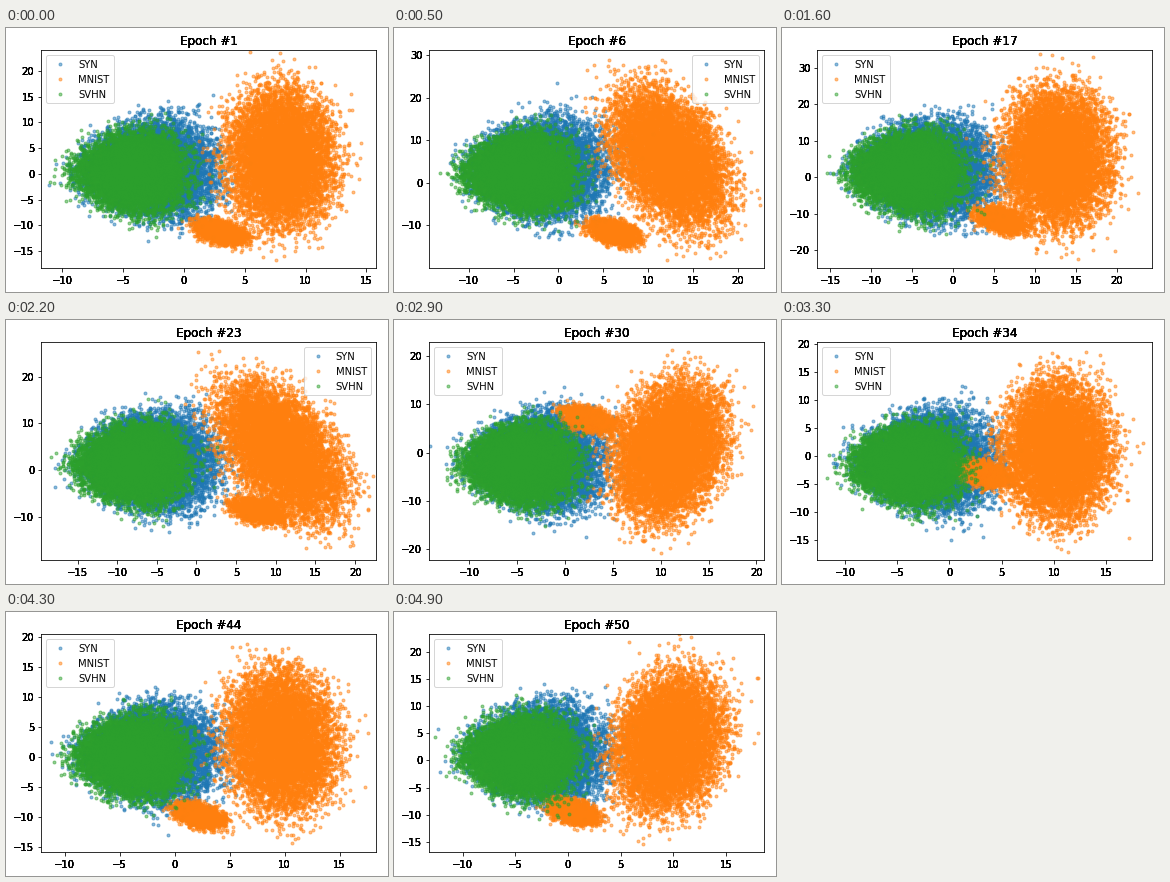
Write a matplotlib script that moves like this. It is 382 by 264 pixels and loops after 5000 ms.

```python
import matplotlib.pyplot as plt
import numpy as np
from matplotlib.animation import FuncAnimation

WIDTH, HEIGHT, DPI = 382, 264, 72
LEFT, TOP, AX_W, AX_H = 35.3, 22.3, 334.8, 217.44
EPOCHS = 50
PASSES = 6  # titles and tick labels are overprinted, which thickens them

# Epoch: x limits, y limits, lean of the MNIST cloud, centre of its side clump
KEYS = {
    1: (-11.73, 15.8, -18.2, 24.0, 0.0, 214, 204),
    10: (-16.55, 28.65, -21.4, 36.9, 0.6, 224, 204),
    17: (-16.55, 24.3, -24.75, 34.85, 0.0, 218, 191),
    23: (-19.57, 22.65, -19.2, 27.35, 0.45, 250, 190),
    30: (-14.2, 20.8, -22.2, 22.9, -0.2, 194, 99),
    38: (-11.1, 18.04, -14.8, 17.65, 0.25, 207, 207),
    50: (-13.15, 18.6, -16.8, 23.2, -0.15, 179, 199),
}


def pose(epoch):
    return [np.interp(epoch, list(KEYS), track) for track in zip(*KEYS.values())]


def blob(rng, count, x, y, rx, ry, lean=0.0, taper=0.0):
    """Points in stage pixels: an even core with a soft rim."""
    angle = rng.uniform(0, 2 * np.pi, count)
    radius = np.abs(rng.normal(size=count)) ** 0.6 / 2
    u, v = radius * np.cos(angle), radius * np.sin(angle)
    v *= 1 + taper * np.clip(u, -1, 1)
    return np.array([x + rx * u + lean * ry * v, y + ry * v])


plt.rcParams["font.family"] = "DejaVu Sans"
fig = plt.figure(figsize=(WIDTH / DPI, HEIGHT / DPI), dpi=DPI, facecolor="white")
box = [LEFT / WIDTH, 1 - (TOP + AX_H) / HEIGHT, AX_W / WIDTH, AX_H / HEIGHT]
layers = [fig.add_axes(box, label=str(i)) for i in range(PASSES)]
base = layers[0]
titles = [layer.set_title("", fontsize=12, pad=5) for layer in layers]
base.tick_params(axis="x", pad=4.5)
for layer in layers[1:]:
    layer.set_frame_on(False)
    layer.tick_params(axis="x", length=0, pad=8)
    layer.tick_params(axis="y", length=0, pad=7)

dots = {
    name: base.plot([], [], ".", color=color, markersize=6, alpha=0.5,
                    label=name, transform=base.transAxes)[0]
    for name, color in [("SYN", "C0"), ("MNIST", "C1"), ("SVHN", "C2")]
}


def place(name, points):
    x, y = points
    dots[name].set_data((x - LEFT) / AX_W, 1 - (y - TOP) / AX_H)


def update(frame):
    epoch = frame + 1
    rng = np.random.default_rng(epoch)
    x0, x1, y0, y1, lean, clump_x, clump_y = pose(epoch)

    place("SYN", blob(rng, 9000, 145, 141, 94, 68, taper=0.3))
    place("MNIST", np.hstack([
        blob(rng, 8500, 275, 130, 80, 102, lean),
        blob(rng, 1500, clump_x, clump_y, 36, 20, lean=0.8),
    ]))
    place("SVHN", blob(rng, 9000, 126, 144, 78, 56, taper=0.3))

    for layer, title in zip(layers, titles):
        layer.set_xlim(x0, x1)
        layer.set_ylim(y0, y1)
        title.set_text(f"Epoch #{epoch}")

    # The legend sits in the corner the cloud leans away from
    corner = "upper right" if lean > 0.1 else "upper left"
    for text in base.legend(loc=corner, fontsize=10).get_texts():
        text.set_y(-1)
    return []


anim = FuncAnimation(fig, update, frames=EPOCHS, interval=100,
                     repeat=True, repeat_delay=0, init_func=lambda: [])
plt.show()
```
